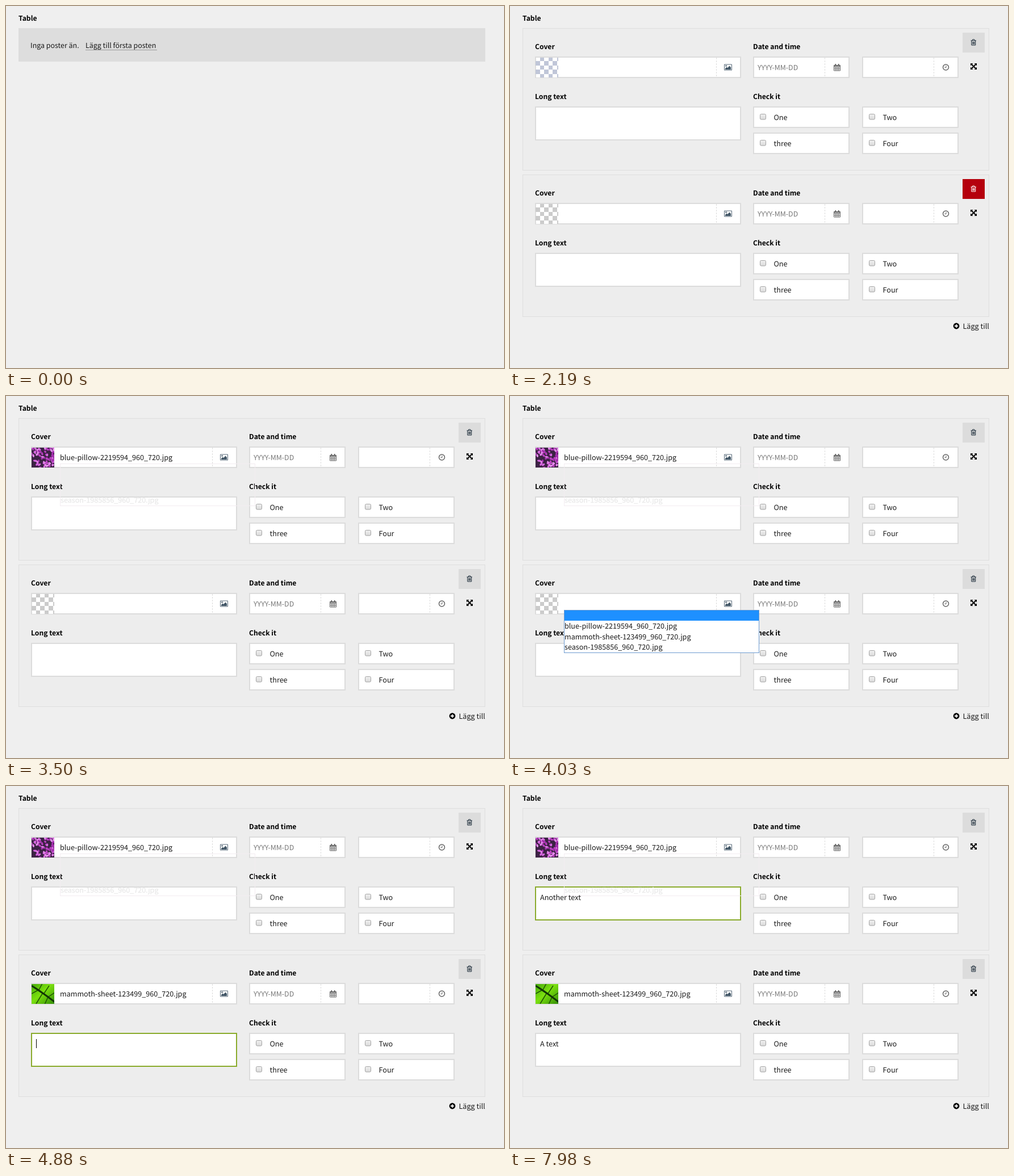
Animation, 877 px wide and 638 px high, one loop 8000 ms. Source, as an HTML page:

```html
<!DOCTYPE html>
<html lang="sv">
<head>
<meta charset="utf-8">
<title>Table</title>
<style>
  html, body { margin: 0; width: 100%; height: 100%; overflow: hidden; background: #efefef; }
  svg { display: block; }
  text {
    font: 12.6px "Noto Sans CJK JP", "Noto Sans CJK SC", "Noto Sans CJK KR", "Noto Sans CJK", "Open Sans", sans-serif;
    fill: #1a1a1a; white-space: pre; text-rendering: geometricPrecision;
  }
  .label { font-weight: 700; font-size: 12.15px; fill: #000; }
  .link { font-size: 12.45px; }
  .hint { font-size: 12.4px; fill: #777; }
  rect, .crisp { shape-rendering: crispEdges; }
  .field { fill: #fff; stroke: #dcdcdc; stroke-width: 2; }
  .split { stroke: #dcdcdc; stroke-dasharray: 3 2; }
  .icon { fill: none; stroke: #666; }
  .hide { display: none; }
</style>
</head>
<body>
<svg id="stage" width="877" height="638" viewBox="0 0 877 638"></svg>
<script>
const LOOP = 8000, CARD_STEP = 258, ROW = 18.6;
const FILES = ["", "blue-pillow-2219594_960_720.jpg", "mammoth-sheet-123499_960_720.jpg", "season-1985856_960_720.jpg"];

const rect = (x, y, w, h, fill, extra = "") =>
  `<rect x="${x}" y="${y}" width="${w}" height="${h}" fill="${fill}" ${extra}/>`;
const text = (x, y, s, cls = "", extra = "") => `<text x="${x}" y="${y}" class="${cls}" ${extra}>${s}</text>`;
const path = (d, cls = "icon", extra = "") => `<path d="${d}" class="${cls}" ${extra}/>`;
const field = (x, y, w, h, name = "") =>
  `<rect x="${x + 1}" y="${y + 1}" width="${w - 2}" height="${h - 2}" class="field ${name}"/>`;
const split = x => path(`M${x + .5} 91V125`, "split crisp");

function seeded(seed) {
  return () => (seed = (seed * 16807) % 2147483647) / 2147483647;
}

function checker(color) {
  let s = rect(46, 91, 39, 35, "#fff");
  for (let r = 0; r < 5; r++)
    for (let c = 0; c < 6; c++)
      if ((r + c) % 2) s += rect(45 + c * 7.6, 90 + r * 7.4, 7.6, 7.4, color);
  return `<g clip-path="url(#thumb)">${s}</g>`;
}

function flowers() {
  const rnd = seeded(71), tones = ["#b83fc0", "#d66adf", "#e58bec", "#a42fae"];
  let s = rect(45, 90, 41, 37, "#3c2244");
  for (let i = 0; i < 75; i++) {
    const x = 45 + rnd() * 41, y = 90 + rnd() * 37;
    s += `<ellipse cx="${x}" cy="${y}" rx="${2 + rnd() * 1.5}" ry="1.7" fill="${tones[i % 4]}"
      transform="rotate(${rnd() * 180} ${x} ${y})"/>`;
  }
  return s;
}

function leaf() {
  return rect(45, 90, 41, 37, "url(#green)")
    + path("M45 94L60 105 86 122M57 103L64 90M66 109L76 94M74 114L86 106M56 102L45 108M64 108L53 126M74 114L68 127",
      "", 'fill="none" stroke="#1d5204" stroke-width="1.5"')
    + path("M45 94Q62 104 86 123", "", 'fill="none" stroke="#123604" stroke-width="3"');
}

const pictureIcon = path("M377.5 103H390.5V113H377.5Z", "icon", 'stroke="#667788" style="stroke:#566878"')
  + path("M379 112V110L381.5 107.5 383 109 386.5 105.5 389 108V112Z", "", 'fill="#445868"')
  + '<circle cx="380.5" cy="105.5" r="1.2" fill="#445868"/>';
const calendarIcon = path("M570.5 104.5H581.5V114H570.5ZM570.5 107.5H581.5M570.5 110.7H581.5M573.3 107V114M576 107V114M578.7 107V114")
  + path("M570.5 105.2H581.5M573.3 102V105M578.7 102V105", "icon", 'stroke-width="2"');
const clockIcon = '<circle cx="767.5" cy="108" r="5" class="icon" stroke-width="1.5"/>' + path("M768 105V108.5H765.5");
const moveIcon = path("M812.5 102.5L820.5 110.5M820.5 102.5L812.5 110.5", "", 'stroke="#000" stroke-width="1.9"')
  + path("M811 101h4.4l-4.4 4.4zM822 101v4.4l-4.4-4.4zM811 112v-4.4l4.4 4.4zM822 112h-4.4l4.4-4.4z", "");
const trashIcon = path("M811.5 61H821M814 61L814.7 59H817.8L818.5 61M812.8 61V69H819.7V61M814.8 63V67.5M816.3 63V67.5M817.8 63V67.5",
  "trash", 'fill="none"');

function option(x, y, s) {
  return `<g class="option">${rect(x, y, 342, ROW, "none")}${text(96, y + 14, s)}</g>`;
}

function card(i) {
  const checks = ["One", "Two", "three", "Four"].map((s, n) => {
    const x = n % 2 ? 620 : 428, y = n < 2 ? 177 : 223;
    return field(x, y, 170, 38)
      + `<rect x="${x + 12.5}" y="${y + 13.5}" width="10" height="9.5" rx="2" fill="url(#box)" stroke="#a3a3a3" style="shape-rendering:auto"/>`
      + text(x + 36.5, y + 24, s);
  }).join("");

  return `<g id="card${i}" transform="translate(0 ${i * CARD_STEP})">`
    + rect(22.5, 39.5, 821, 250, "#ededed", 'stroke="#dedede"')
    + text(44, 76, "Cover", "label") + text(428, 76, "Date and time", "label")
    + text(44, 164, "Long text", "label") + text(428, 164, "Check it", "label")
    + field(44, 89, 363, 38) + split(363) + pictureIcon
    + field(428, 89, 170, 38) + split(554) + text(436, 113, "YYYY-MM-DD", "hint") + calendarIcon
    + field(620, 89, 170, 38) + split(746) + clockIcon
    + field(44, 177, 363, 60, "area") + checks
    + checker(i ? "#cbcbcb" : "#c0c6d8")
    + `<g class="cover"><g clip-path="url(#thumb)">${i ? leaf() : flowers()}</g>${text(95, 113, FILES[i + 1])}</g>`
    + rect(797, 47, 39, 35, "#dcdcdc", 'class="button"') + trashIcon + moveIcon
    + (i ? "" : `<g class="ghost">${rect(95.5, 119.5, 343, 74, "none", 'stroke="#f3ecf1"')}${text(96, 188, FILES[3], "", 'style="fill:#e7e7e7;stroke:#ededed;stroke-width:.4"')}</g>`)
    + text(53, 201, "", "typed") + rect(53, 188, 1, 16, "#000", 'class="caret"')
    + `<g class="menu">${rect(95.5, 119.5, 343, 75, "#fff", 'stroke="#6d9bd0"')}`
    + rect(96, 120, 342, 17.5, "#fff8ff")
    + FILES.map((s, n) => option(96, 119.6 + n * ROW, s)).join("") + "</g></g>";
}

const stage = document.getElementById("stage");
stage.innerHTML = `<defs>
  <clipPath id="thumb"><rect x="45" y="91" width="40" height="35"/></clipPath>
  <linearGradient id="green" x2="1" y2="1"><stop stop-color="#43a808"/><stop offset=".45" stop-color="#7be00f"/><stop offset="1" stop-color="#2f8a05"/></linearGradient>
  <linearGradient id="box" x2="0" y2="1"><stop stop-color="#f0f0f0"/><stop offset="1" stop-color="#dadada"/></linearGradient>
  </defs>`
  + text(22, 26, "Table", "label")
  + `<g id="empty">${rect(22, 39, 822, 59, "#dddddd")}${text(43, 74, "Inga poster än.", "link")}`
  + text(140, 74, "Lägg till första posten", "link") + rect(140, 77, 126, 1, "#999") + "</g>"
  + card(0) + card(1)
  + `<g id="add"><circle cx="786" cy="306" r="5.4"/>${path("M786 303V309M783 306H789", "", 'stroke="#efefef" stroke-width="1.8"')}${text(797.5, 311, "Lägg till")}</g>`;

const byId = id => document.getElementById(id);
const GREEN = "#8aab2c", GREY = "#dcdcdc", MID = "#b2c286";

// Each step: time in ms, then the values that change.
const steps = [
  [0, { cards: 0, red: false, menu: -1, pick: 0, covers: 0, focus: -1, border: GREEN, caret: false, text0: "", text1: "" }],
  [1060, { cards: 1 }],
  [2190, { cards: 2, red: true }],
  [2450, { red: false }],
  [2910, { menu: 0 }],
  [3240, { pick: 1 }],
  [3500, { menu: -1, covers: 1 }],
  [4030, { menu: 1, pick: 0 }],
  [4130, { pick: 1 }],
  [4220, { pick: 2 }],
  [4480, { menu: -1, covers: 2 }],
  [4880, { focus: 1, caret: true }],
  ...typing("text1", "A te", 5210, 95),
  [5590, { caret: false }],
  [5790, { text1: "A text", caret: true }],
  [6120, { focus: 0, border: MID }],
  [6250, { border: GREEN }],
  ...typing("text0", "Another ", 6580, 98),
  [7400, { text0: "Another t" }],
  [7460, { text0: "Another te" }],
  [7660, { text0: "Another text" }],
  [7920, { caret: false }]
];

function typing(key, s, start, gap) {
  return [...s].map((_, i) => [start + i * gap, { [key]: s.slice(0, i + 1) }]);
}

const show = (el, on) => el.classList.toggle("hide", !on);

function draw(s) {
  show(byId("empty"), s.cards === 0);
  show(byId("add"), s.cards > 0);
  byId("add").setAttribute("transform", `translate(0 ${(s.cards - 1) * CARD_STEP})`);
  for (let i = 0; i < 2; i++) {
    const el = byId("card" + i), part = name => el.querySelector("." + name);
    const red = i === 1 && s.red, focused = s.focus === i;
    show(el, i < s.cards);
    show(part("cover"), i < s.covers);
    if (i === 0) show(part("ghost"), s.covers > 0);
    part("button").setAttribute("fill", red ? "#b5000d" : "#dcdcdc");
    part("trash").setAttribute("stroke", red ? "#fff" : "#1b2b38");
    part("area").style.stroke = focused ? s.border : GREY;

    const typed = part("typed");
    typed.textContent = s["text" + i];
    show(part("caret"), focused && s.caret);
    if (focused) {
      const width = typed.textContent ? typed.getComputedTextLength() : 0;
      part("caret").setAttribute("x", Math.floor(53 + width));
    }

    show(part("menu"), s.menu === i);
    el.querySelectorAll(".option").forEach((row, n) => {
      const on = n === s.pick;
      row.firstChild.setAttribute("fill", on ? "#1e90ff" : "none");
      row.lastChild.style.fill = on ? "#fff" : "#1a1a1a";
    });
  }
}

const start = performance.now();
let last = -1;
function tick() {
  const t = (performance.now() - start) % LOOP;
  const passed = steps.filter(([at]) => at <= t);
  if (passed.length !== last) {
    last = passed.length;
    draw(Object.assign({}, ...passed.map(step => step[1])));
  }
  requestAnimationFrame(tick);
}
tick();
</script>
</body>
</html>
```
